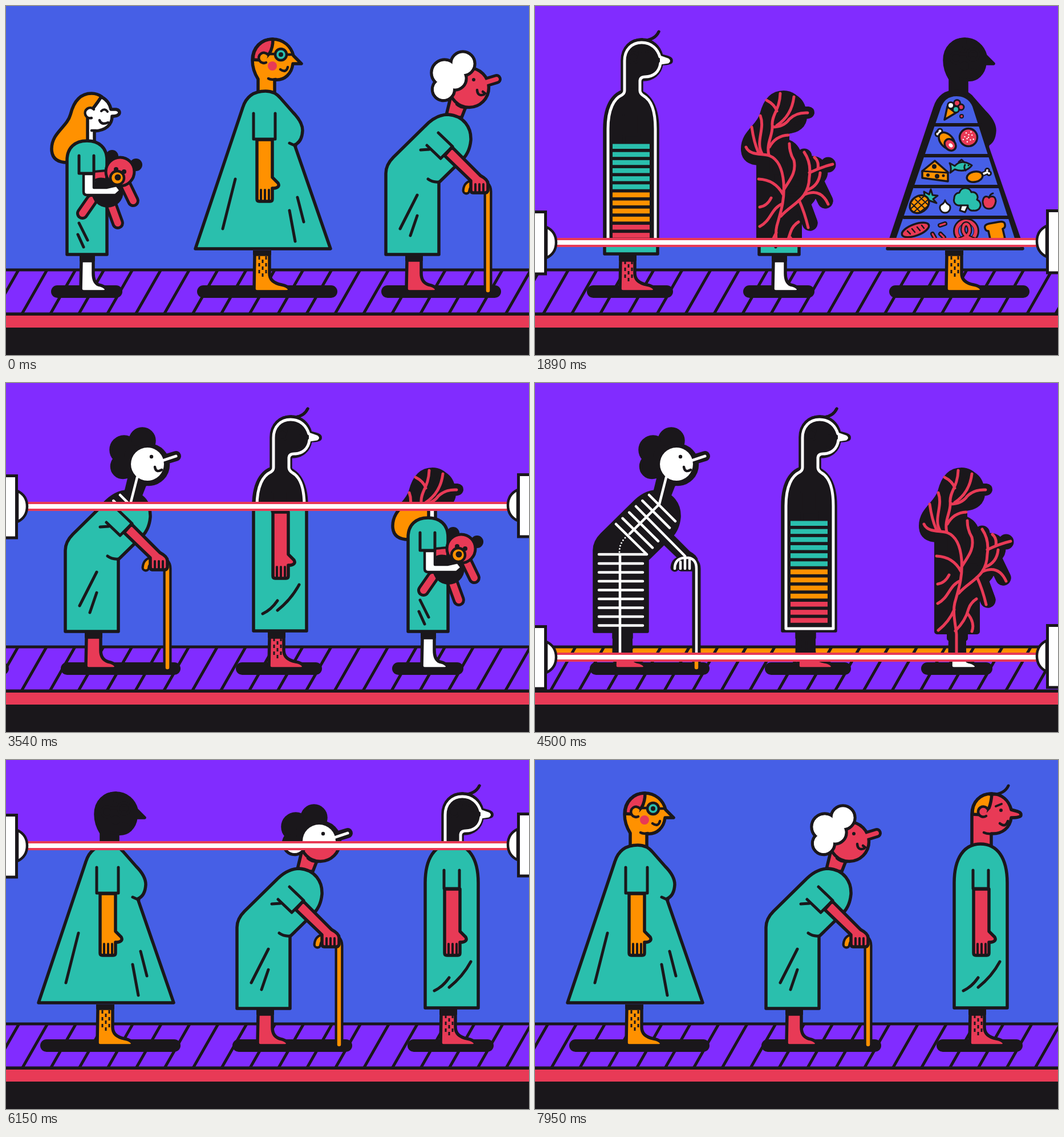
An HTML page that plays this animation: 917 by 611 pixels, repeating every 8 s.

```html
<!DOCTYPE html>
<html lang="en">
<head>
<meta charset="utf-8">
<title>Body scanner</title>
<style>
html, body { margin: 0; width: 100%; height: 100%; overflow: hidden; background: #465fe6; }
svg { display: block; width: 100%; height: 100%; }
.figure { stroke: #1a171b; stroke-width: 5.5; stroke-linecap: round; stroke-linejoin: round; }
.line { fill: none; }
.xray .body * { fill: #1a171b; stroke: #1a171b; }
.xray .body .line { fill: none; }
.xray .body .leg { stroke-width: 10; }
.xray .girl .body { stroke-width: 10; }
.xray .girl circle { stroke-width: 5; }
.xray .girl .limb path { stroke-width: 27; }
</style>
</head>
<body>
<svg id="stage" viewBox="0 0 917 611"></svg>
<script>
const INK = '#1a171b', BLUE = '#465fe6', PURPLE = '#812cff', RED = '#e83a56',
      TEAL = '#2abfad', ORANGE = '#ff9100', WHITE = '#fff';

const range = (n, fn) => Array.from({ length: n }, (_, i) => fn(i)).join('');
const shape = (d, fill, more = '') => `<path d="${d}" fill="${fill}" ${more}/>`;
const line = (d, width = 5, color = INK) =>
  `<path class="line" d="${d}" stroke="${color}" stroke-width="${width}"/>`;
const dot = (x, y, r, fill, width = 0) =>
  `<circle cx="${x}" cy="${y}" r="${r}" fill="${fill}" stroke-width="${width}"/>`;
const oval = (x, y, rx, ry, turn, fill, width = 3.5) =>
  `<ellipse rx="${rx}" ry="${ry}" fill="${fill}" stroke-width="${width}" transform="translate(${x} ${y}) rotate(${turn})"/>`;
const rect = (x, y, w, h, fill, more = '') =>
  `<rect x="${x}" y="${y}" width="${w}" height="${h}" fill="${fill}" stroke="none" ${more}/>`;
const shadow = (x1, x2) => rect(x1, 489, x2 - x1, 22, INK, 'rx="11"');

// Leg with a short dark band below the hem; toe is the right end of the foot.
function leg(x, width, top, toe, color, hairTop) {
  const r = x + width;
  const hairs = hairTop ? [8, 14, 20].map((dx, i) =>
    `<path class="line" d="M${x + dx},${hairTop + (i % 2) * 6}v${i === 1 ? 34 : 31}" stroke-width="3" stroke-linecap="butt" stroke-dasharray="6 6"/>`).join('') : '';
  return shape(`M${x},${top}L${x - 1},495Q${x - 1},500 ${x + 4},500H${toe - 5}Q${toe},500 ${toe},496Q${toe - 3},490 ${toe - 14},488Q${r},484 ${r},468V${top}Z`, color, 'class="leg"') +
    rect(x - 3, 428, width + 6, top - 427, INK) + hairs;
}

function arm(x, top, color) {
  return shape(`M${x},${top}V338q0,4 4,4h19q4,0 4,-4V319h4q10,-2 6,-9l-10,-10V${top}Z`, color) +
    line(`M${x + 7},322v19m7,-19v19m7,-19v19`, 4);
}

const strand = line('M797,60Q822,62 830,45');
const caneTop = 'M584,498V325Q584,311 570,311H559Q547,311 546,323';

const man = {
  shadow: shadow(704, 855),
  body: leg(763, 25, 445, 823, RED, 446) +
    shape('M766,152V95C766,72 782,59 800,59C819,59 831,71 835,87L846,90Q853,92 852,97Q851,101 835,101C833,118 820,130 800,129V152Z', RED) +
    shape('M767,95C766,74 780,59 801,59Q800,74 796,84L785,96Z', ORANGE) +
    shape('M791,98A9,9 0 1 1 793,85', RED, 'stroke-width="4.5"') +
    line('M787,127Q793,130 802,129M815,111Q825,119 829,107', 4.5) + line('M808,81L818,77', 4) +
    dot(817, 88, 3, INK) + strand +
    shape('M735,434V215C735,172 752,147 781,147C811,147 828,172 828,215V434Z', TEAL) +
    arm(769, 226, RED) + line('M768,193V225H795V193') +
    line('M751,404Q766,397 777,381M777,398Q801,379 815,353'),
  inside: strand +
    line('M741,430V215C741,180 752,162 765,156Q770,153 770,148V96C770,76 783,64 800,64C818,64 828,76 832,89L846,94Q849,96 846,98L833,100C831,116 820,124 806,124Q797,124 797,132V148Q797,153 803,157C816,164 824,182 824,215V430Z', 5, WHITE) +
    shape('M832,89L846,94Q849,96 846,98L832,100Z', WHITE, 'stroke="none"') +
    range(13, i => rect(749, 241.5 + 14.15 * i, 65, 8.5, i < 6 ? TEAL : i < 10 ? ORANGE : RED))
};

const vessels = [
  'M141,497V440C139,420 134,402 138,385C145,360 152,340 150,310C148,285 140,268 125,262C112,258 90,262 84,247',
  'M109,192C118,215 100,238 112,258M94,212Q98,240 106,257',
  'M124,261C119,240 132,225 130,208C129,190 143,182 144,153',
  'M130,212Q150,212 160,198Q172,186 192,187M138,209Q164,192 168,159',
  'M120,165Q134,172 138,184M125,247Q136,227 158,226',
  'M150,322C160,305 173,292 168,270Q160,257 160,241',
  'M145,368C165,345 194,340 195,300Q199,275 186,256',
  'M195,292Q215,282 236,277M210,284Q212,272 204,265M192,322Q212,314 214,292',
  'M187,330Q215,318 228,347M177,340Q187,362 193,388',
  'M149,330Q135,304 106,303M148,346C128,354 128,376 108,386M108,352Q121,350 128,336',
  'M137,397Q128,418 109,433M139,434Q157,416 162,396Q166,384 176,378M160,403Q174,420 168,435'
].join('');

const limb = d => `<g class="limb">${line(d, 22)}${line(d, 12, RED)}</g>`;
const girl = {
  shadow: shadow(79, 204),
  body: leg(132, 21, 446, 176, WHITE) +
    shape('M150,153C128,153 118,170 113,190C107,212 80,222 80,250C80,268 92,274 108,274H145V190L168,159Q160,153 150,153Z', ORANGE) +
    shape('M143,240V190Q155,178 167,159Q181,166 184,181L193,181Q199,182 199,187Q198,193 186,193C186,208 175,218 155,219V240Z', WHITE) +
    shape('M150,196A9,9 0 1 1 154,181', WHITE, 'stroke-width="4.5"') +
    line('M150,218H158M164,200Q167,209 179,204', 4.5) + line('M167,184Q173,178 178,185', 4) +
    shape('M107,435V270C107,248 121,236 142,236C163,236 177,248 177,270V435Z', TEAL) +
    line('M128,380L143,410M126,400L136,422') +
    limb('M150,340L134,363') + limb('M185,350L196,380') + limb('M209,312L223,341') +
    dot(178, 325, 28, INK) + shape('M154,290L176,288V304Q164,300 154,306Z', RED, 'stroke-width="4"') +
    dot(186, 263, 11, INK) + dot(228, 278, 11, INK) +
    dot(200, 290, 25, RED, 5) + dot(193, 286, 4, INK) + dot(207, 290, 4, INK) +
    dot(195, 301, 12, ORANGE, 4.5) + dot(196, 300, 5.5, INK) +
    shape('M136,294V325Q136,331 142,331H192L201,323L194,314L176,318H154V294Z', WHITE, 'stroke-width="4.5"') +
    line('M128,262V293H154V262'),
  inside: line(vessels, 5, RED)
};

const foods =
  // ice cream
  shape('M162,176L177,187L157,199Z', ORANGE, 'stroke-width="3.5"') + dot(179, 170, 5.5, RED, 3) +
  dot(186, 177, 5, RED, 3) + dot(168, 174, 5.5, WHITE, 3) + dot(177, 181, 5.5, TEAL, 3) + dot(187, 193, 3, RED, 2) +
  // ham and salami
  line('M146,221L155,228', 9) + dot(145, 224, 4, WHITE, 3) + dot(149, 219, 4, WHITE, 3) + line('M147,222L155,229', 4, WHITE) +
  oval(161, 236, 17, 11, 48, ORANGE) + oval(167, 243, 11, 9, 48, RED) + oval(168, 244, 4, 3, 48, WHITE, 0) +
  dot(199, 230, 15.5, RED, 3.5) +
  range(11, i => dot(199 + 3.3 * Math.sqrt(i) * Math.cos(2.4 * i), 230 + 3.3 * Math.sqrt(i) * Math.sin(2.4 * i), 1.2, WHITE)) +
  // cheese, fish, drumstick
  shape('M118,289L140,271L163,291V307L118,301Z', ORANGE, 'stroke-width="3.5"') + line('M118,289L163,292', 3) +
  dot(139, 281, 4, INK) + dot(128, 296, 3, INK) + dot(144, 298, 4, INK) + dot(155, 297, 2.5, INK) +
  shape('M166,275L175,280Q187,267 205,279Q194,293 175,286L167,292Q170,283 166,275Z', TEAL, 'stroke-width="3"') +
  line('M182,273L187,269L192,274M193,278Q190,283 194,288', 3) + dot(199, 279, 1.5, INK) +
  line('M220,296L232,291', 8) + dot(232, 288, 3.5, WHITE, 3) + dot(235, 293, 3.5, WHITE, 3) +
  line('M220,296L232,291', 4, WHITE) + oval(210, 299, 14, 9, -12, ORANGE) +
  // pineapple, onion, broccoli, apple
  shape('M123,338L121,325L130,330L133,321L136,331L145,332L137,338L143,345Z', TEAL, 'stroke-width="3"') +
  oval(113, 347, 18, 14, -35, ORANGE) +
  line('M100,346L115,361M106,339L123,355M113,334L127,347M99,354L120,334M104,360L127,340M112,362L128,350', 2) +
  shape('M158,340Q159,345 166,349A9,9 0 1 1 150,349Q157,345 158,340Z', WHITE, 'stroke-width="3"') +
  shape('M187,347L184,358L193,361L199,348Z', WHITE, 'stroke-width="3"') +
  shape('M184,349A9,9 0 0 1 174,337A9,9 0 0 1 183,327A11,11 0 0 1 204,326A9,9 0 0 1 214,339A10,10 0 0 1 208,358A8,8 0 0 1 198,349Z', TEAL, 'stroke-width="3"') +
  shape('M235,335Q246,330 247,342Q245,355 235,355Q225,355 224,343Q225,330 235,335Z', RED, 'stroke-width="3"') + line('M235,336Q237,329 242,328', 3) +
  // bread, beans, pretzel, toast
  oval(106, 392, 25, 10, -20, RED) + line('M92,394L97,399M100,390L105,396M109,387L114,393M117,384L121,389', 2.5) +
  line('M149,384L158,381M136,399L140,406M150,399L156,405', 8) + line('M149,384L158,381M136,399L140,406M150,399L156,405', 3, RED) +
  line('M184,409H207', 10) + dot(195, 394, 18, 'none', 10) +
  `<circle cx="195" cy="394" r="17" fill="none" stroke="${RED}" stroke-width="6"/>` +
  line('M184,409Q207,401 199,384Q195,379 191,384Q184,401 208,409', 9) +
  line('M184,409Q207,401 199,384Q195,379 191,384Q184,401 208,409', 4.5, RED) +
  shape('M228,389Q226,383 235,381L252,378Q263,376 263,383Q264,388 259,390L263,407L238,412L234,394Q229,394 228,389Z', ORANGE, 'stroke-width="3.5"');

const woman = {
  shadow: shadow(60, 306),
  body: leg(161, 26, 435, 222, ORANGE, 438) +
    shape('M167,152V128Q157,112 157,95C157,72 173,58 192,58C212,58 225,71 229,87L243,101L228,101C226,118 214,131 196,129V152Z', ORANGE) +
    shape('M158,94C158,73 173,58 193,58Q193,73 187,83L176,95Z', RED) +
    shape('M181,99A9,9 0 1 1 184,85', ORANGE, 'stroke-width="4.5"') +
    line('M185,127Q190,130 198,128M206,111Q216,118 219,107M184,84H196M218,85H227', 4.5) +
    dot(192, 105, 8, RED) + dot(207, 85, 10, TEAL, 4.5) + dot(207, 85, 4, INK) +
    shape('M57,425L140,178Q149,149 180,149Q196,149 206,161L228,186Q245,203 245,218Q244,238 231,243L294,425Z', TEAL) +
    line('M222,240L233,245') + arm(165, 234, ORANGE) + line('M159,188V233H197V188') +
    line('M127,303L105,390M236,335L247,378M222,358L232,412'),
  inside: shape('M69,416L150,180Q157,158 178,158Q198,158 206,176L283,416Z', BLUE, 'stroke="none"') +
    line('M140,208H220M122,262H236M104,316H254M86,370H272', 6) + foods
};

const oldLady = {
  shadow: shadow(397, 607),
  body: leg(442, 25, 445, 494, RED) +
    shape('M519,158L510,195H538L545,177Z', RED) +
    line('M579,134L599,128', 18) + dot(551, 143, 34.5, RED, 5.5) + line('M573,136L599,128', 8, RED) +
    dot(559, 129, 3, INK) + line('M565,147Q566,159 577,155M575,150L579,153M529,172Q536,179 548,178', 4.5) +
    [[540, 101, 21], [508, 117, 23], [506, 146, 19.5], [526, 127, 20]].map(a => dot(...a, WHITE, 5.5)).join('') +
    [[540, 101, 18.5], [508, 117, 20.5], [506, 146, 17], [526, 127, 17.5]].map(a => `<g stroke="none">${dot(...a, WHITE)}</g>`).join('') +
    shape('M405,435V293Q405,278 418,265L473,211Q493,190 514,190C542,192 555,213 554,235Q552,256 540,268L498,309V435Z', TEAL) +
    line('M479,303Q487,309 498,308M460,331L430,390M460,367L448,402M466,252L481,251') +
    line(caneTop, 15) + line(caneTop, 6.5, ORANGE) +
    shape('M521,247L571,297Q584,304 584,311V323Q583,327 579,327H558Q554,327 554,322V306L508,262Z', RED) +
    line('M562,312V326M569,312V326M576,312V326', 4) +
    line('M497,222L522,246L501,267L477,244'),
  inside: dot(549, 142, 29, WHITE) + line('M575,136L599,128', 5, WHITE) +
    dot(556, 129, 3.2, INK) + line('M562,147Q564,158 574,152', 4.5) +
    line('M531,165L519,212L467,264M450,300V496H479M413,300H497' +
      range(8, i => `M413,${316 + 15.5 * i}H490`) +
      range(6, i => i === 2 ? '' : `M${501 - 11.6 * i},${196 + 10.2 * i}L${547 - 10 * i},${242 + 11.6 * i}`), 4.5, WHITE) +
    line('M478,216L564,303', 4.5, WHITE) +
    `<path class="line" d="M459,271Q449,281 449,296" stroke="${WHITE}" stroke-width="3" stroke-dasharray="0 5.5"/>` +
    line('M546,325Q546,308 562,306H570Q584,308 584,325V498M556,325V313M564,325V308M572,325V309', 4.5, WHITE)
};

function figure(person, name, x, xray) {
  return `<g class="figure ${name}" transform="translate(${x} 0)">${xray ? '' : person.shadow}<g class="body">${person.body}</g>${xray ? person.inside : ''}</g>`;
}

function scene(xray) {
  const row = [[woman, 'woman', -899], [oldLady, 'old', -899], [man, 'man', -899],
               [girl, 'girl', 0], [woman, 'woman', 275], [oldLady, 'old', 261]];
  const seams = range(40, i => `M${22 + 49.9 * (i - 20)},462l-44,77`);
  return rect(0, 0, 917, 611, xray ? PURPLE : BLUE) +
    rect(0, 462, 917, 77, xray ? ORANGE : PURPLE) +
    rect(0, 539, 917, 24, xray ? TEAL : RED) + rect(0, 563, 917, 48, INK) +
    rect(0, 459.5, 917, 5, INK) + rect(0, 536.5, 917, 5.5, INK) +
    `<g class="row">${line(seams)}${row.map(r => figure(...r, xray)).join('')}</g>`;
}

const cap = rect(-10, -53.5, 28.5, 108.5, WHITE, `style="stroke:${INK};stroke-width:5"`) +
  `<path d="M20,-27Q37,-19 37,0Q37,19 20,27Z" fill="${WHITE}" stroke="${INK}" stroke-width="4.5"/>`;

document.getElementById('stage').innerHTML =
  `<defs><clipPath id="above"><rect id="scanned" width="917" height="0"/></clipPath></defs>
  <g>${scene(false)}</g>
  <g class="xray" clip-path="url(#above)">${scene(true)}</g>
  <g id="bar">${rect(34, -8, 848, 16, RED)}${rect(34, -4, 848, 8, WHITE)}${cap}
  <g transform="translate(917 -2) scale(-1 1)">${cap}</g></g>`;

const LOOP = 8000, STEP = 30, CYCLE = 90, MOVE = 10;
const stops = [0, 286, 598, 899];
const rows = document.querySelectorAll('.row');
const scanned = document.getElementById('scanned');
const bar = document.getElementById('bar');

function draw(now) {
  const tick = Math.min(265, Math.floor(now % LOOP / STEP));
  const cycle = Math.floor(tick / CYCLE), local = tick % CYCLE;
  const from = stops[cycle], to = stops[cycle + 1];
  const x = from + (to - from) * Math.min(local / MOVE, 1);
  const y = 700 - 22 * Math.abs(local - 50);
  rows.forEach(row => row.setAttribute('transform', `translate(${x} 0)`));
  scanned.setAttribute('height', Math.max(0, y));
  bar.setAttribute('transform', `translate(0 ${y})`);
}

const start = performance.now();
function tickLoop() {
  draw(performance.now() - start);
  requestAnimationFrame(tickLoop);
}
tickLoop();
</script>
</body>
</html>
```
